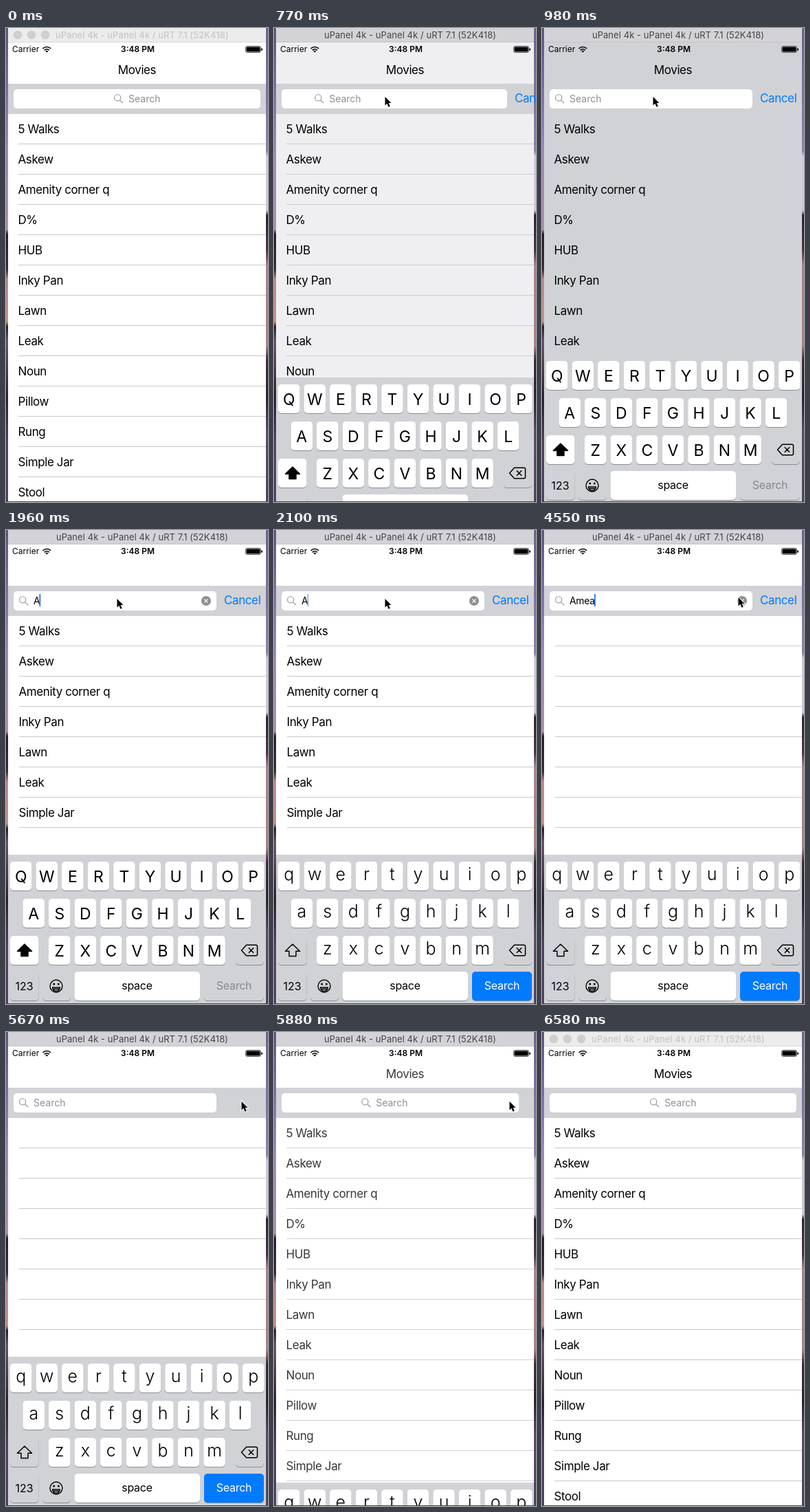
An HTML page with a canvas for the animation above (6650 ms loop, 381 by 689 pixels).

```html
<!DOCTYPE html>
<html lang="en">
<head>
<meta charset="utf-8">
<title>Movie search</title>
<style>
  html, body { margin: 0; width: 100%; height: 100%; overflow: hidden; }
  canvas { display: block; }
</style>
</head>
<body>
<canvas id="stage" width="381" height="689"></canvas>
<script>
const c = document.getElementById('stage').getContext('2d');
const LOOP = 6650, STEP = 70;
const GREY = '#d1d2d6', BLUE = '#007aff', LINE = '#c8c7cc', HINT = '#8e8e93';

const movies = ['5 Walks', 'Askew', 'Amenity corner q', 'D%', 'HUB', 'Inky Pan', 'Lawn',
  'Leak', 'Noun', 'Pillow', 'Rung', 'Simple Jar', 'Stool'];

// Step tracks: the last entry not later than t applies.
const typed = [[0, ''], [1960, 'A'], [2590, 'Am'], [4060, 'Ame'], [4550, 'Amea'], [5600, '']];
const caret = [[0, 0], [1050, 1], [1400, 0], [1540, .33], [1610, .66], [1680, 1], [2030, .8],
  [2100, .5], [2590, 1], [3220, .6], [3290, 0], [3430, .5], [3500, 1], [3780, .5], [3850, 0],
  [4060, 1], [5110, .5], [5180, 0], [5320, 1], [5530, 0]];
// Pointer stops: time, x, y; eased in between.
const pointer = [[70, 192, 26], [280, 162, 100], [3150, 162, 100], [3570, 285, 99], [3710, 285, 99],
  [3850, 286, 98], [5040, 286, 98], [5320, 343, 101], [5950, 343, 101], [6160, 293, 101],
  [6230, 272, 66], [6300, 225, 0]];

const at = (track, t) => track.findLast(k => k[0] <= t)[1];
const mix = (a, b, p) => a + (b - a) * p;
function smooth(t, start, length) {
  const p = Math.min(1, Math.max(0, (t - start) / length));
  return p * p * (3 - 2 * p);
}
// Critically damped spring: share of the way covered.
function spring(t, start) {
  const x = Math.max(0, t - start) * .0155;
  return 1 - (1 + x) * Math.exp(-x);
}

function rect(x, y, w, h, color, r = 0) {
  c.fillStyle = color;
  c.beginPath();
  c.roundRect(x, y, w, h, r);
  c.fill();
}
function disc(x, y, r, color) {
  c.fillStyle = color;
  c.beginPath();
  c.arc(x, y, r, 0, 7);
  c.fill();
}
function line(path, color, width) {
  c.strokeStyle = color;
  c.lineWidth = width;
  c.stroke(new Path2D(path));
}
function text(s, x, y, size, color = '#000', align = 'left', weight = 400, spacing = 0) {
  c.font = `${weight} ${size}px Inter, Roboto, sans-serif`;
  c.letterSpacing = spacing + 'px';
  c.textAlign = align;
  c.fillStyle = color;
  c.fillText(s, x, y);
  return c.measureText(s).width;
}

function strip(x, stops) {
  const g = c.createLinearGradient(0, 0, 0, 689);
  stops.forEach(([p, color]) => g.addColorStop(p, color));
  rect(x, 0, 3, 689, g);
}
function desktop() {
  strip(0, [[0, '#5d5478'], [.12, '#7b6a9e'], [.25, '#9a86b4'], [.425, '#b08ea6'], [.435, '#2a1c26'],
    [.51, '#3a2a38'], [.53, '#b88a8a'], [.62, '#c0908a'], [.63, '#2a1e28'], [.66, '#6a4f66'],
    [.73, '#4a3446'], [.78, '#2a2030'], [.88, '#55405e'], [1, '#4c4060']]);
  strip(378, [[0, '#6c6090'], [.26, '#8a7fae'], [.27, '#cfc8dc'], [.385, '#cfc8dc'], [.395, '#2b2030'],
    [.47, '#4a3448'], [.5, '#a88088'], [.67, '#a88080'], [.7, '#3a2a3a'], [.78, '#2a2030'],
    [.85, '#5a4866'], [1, '#4c4060']]);
  rect(0, 688, 381, 1, '#4c4060');
}

function titleBar(active) {
  rect(3, 0, 375, 21, active ? '#d3d3d7' : '#ececec', [4, 4, 0, 0]);
  rect(3, 20, 375, 1, active ? '#c4c4c8' : '#d8d8d8');
  if (!active) [17, 37, 57].forEach(x => disc(x, 10, 6.3, '#cfcfcf'));
  text('uPanel 4k - uPanel 4k / uRT 7.1 (52K418)', 198, 15, 13,
    active ? '#444' : '#c8c8c8', 'center', active ? 400 : 500, .06);
}

function statusBar() {
  text('Carrier', 9, 35, 12);
  text('3:48 PM', 191.5, 35, 12, '#000', 'center', 600);
  line('M53.5 30a8 8 0 0 1 11.6 0M55.8 32.3a5 5 0 0 1 7 0', '#000', 1.7);
  c.fillStyle = '#000';
  c.fill(new Path2D('M57.3 33.6a3 3 0 0 1 4 0l-2 2.2z'));
  line('M350.5 26.5h18q2 0 2 2v5q0 2-2 2h-18q-2 0-2-2v-5q0-2 2-2z', '#555', 1);
  rect(349.5, 27.5, 20, 7, '#000', 1);
  rect(371.3, 29.5, 1.6, 3.5, '#000', 1);
}

function separators(x) {
  for (let y = 168; y < 688; y += 44) rect(x, y, 378 - x, 1, LINE);
}
function rows(list, x) {
  list.forEach((s, i) => text(s, x, 153 + 44 * i, 17, '#000', 'left', 400, -.4));
}

function mainList(dim) {
  rect(3, 21, 375, 667, '#fff');
  separators(18);
  c.globalAlpha = dim;
  rect(3, 21, 375, 667, GREY);
  c.globalAlpha = 1;
  text('Movies', 190.5, 67, 17, '#000', 'center', 400, -.4);
  rows(movies, 17.5);
}

function results(list, alpha) {
  c.globalAlpha = alpha;
  rect(3, 21, 375, 667, '#fff');
  separators(19);
  rows(list, 18.5);
  c.globalAlpha = 1;
}

function searchBar(t, query, open, shift) {
  rect(3, 81, 375, 44, GREY);
  const right = mix(370, 306, open), x = mix(157, 19, shift);
  rect(11, 89, right - 11, 28, '#fff', 5);
  c.strokeStyle = HINT;
  c.lineWidth = 1.1;
  c.beginPath();
  c.arc(x + 5.2, 101.4, 4.6, 0, 7);
  c.moveTo(x + 8.6, 104.8);
  c.lineTo(x + 13, 109);
  c.stroke();

  let w = 0;
  if (query) {
    w = text(query, 40, 108, 14, '#000', 'left', 400, -.3);
    disc(291, 103, 7, HINT);
    line('M288.4 100.4l5.2 5.2m0-5.2l-5.2 5.2', '#fff', 1.3);
  } else {
    text('Search', x + 21, 108, 14, HINT);
  }
  c.globalAlpha = at(caret, t);
  rect(39 + w, 93, 2, 18, '#3b74f2');
  c.globalAlpha = t >= 5600 ? 0 : t >= 5530 ? .3 : 1;
  if (open > 0) text('Cancel', right + 11, 108, 17, BLUE, 'left', 400, -.4);
  c.globalAlpha = 1;
}

function key(x, y, w, color) {
  rect(x, y + 1, w, 42, '#8b8d92', 5);
  rect(x, y, w, 42, color, 5);
}

function keyboard(offset, upper) {
  c.save();
  c.beginPath();
  c.rect(3, 21, 375, 667);
  c.clip();
  c.translate(0, Math.floor(offset));
  rect(3, 472, 375, 217, GREY);

  [['qwertyuiop', 6, 482], ['asdfghjkl', 24.5, 536], ['zxcvbnm', 62, 590]].forEach(([letters, x0, y]) => {
    [...letters].forEach((ch, i) => {
      const x = x0 + 37.55 * i;
      key(x, y, 31.5, '#fff');
      if (upper) text(ch.toUpperCase(), x + 15.75, y + 29.5, 23, '#000', 'center');
      else text(ch, x + 15.75, y + 27, 25, '#000', 'center', 300);
    });
  });

  key(6, 590, 41.5, upper ? '#fff' : GREY);
  const arrow = 'M27 602l10.5 10.2h-5.5v7.3h-10v-7.3h-5.5z';
  c.lineJoin = 'round';
  line(arrow, '#000', 1.5);
  if (upper) {
    c.fillStyle = '#000';
    c.fill(new Path2D(arrow));
  }
  key(334, 590, 41, GREY);
  line('M342.5 611l7-7.8h14q2 0 2 2v11.6q0 2-2 2h-14zM352.8 607.3l7.4 7.4m0-7.4l-7.4 7.4', '#000', 1.5);

  key(6, 642, 41.5, GREY);
  text('123', 26.5, 669, 16, '#000', 'center');
  key(53, 642, 41, GREY);
  line('M82 663a9 9 0 1 1-18 0a9 9 0 1 1 18 0zM67.5 665h11q-1 5-5.5 5t-5.5-5zM68 667.3h10', '#000', 1.4);
  disc(69.7, 660, 1.5, '#000');
  disc(76.3, 660, 1.5, '#000');
  key(99.5, 642, 182.5, '#fff');
  text('space', 190.5, 668, 16, '#000', 'center', 400, -.3);
  key(288, 642, 87, upper ? GREY : BLUE);
  text('Search', 331.5, 668, 16, upper ? '#87888d' : '#fff', 'center', 400, -.3);
  c.restore();
}

function drawPointer(t) {
  if (t < 70 || t >= 6370) return;
  const i = pointer.findLastIndex(k => k[0] <= t);
  const a = pointer[i], b = pointer[i + 1] || a;
  const p = smooth(t, a[0], b[0] - a[0] || 1);
  c.save();
  c.translate(mix(a[1], b[1], p) - .5, mix(a[2], b[2], p));
  c.scale(.92, .92);
  const arrow = 'M0 0v13.5l3.1-2.9 2.3 5.4 2.5-1.1-2.3-5.2h4.2z';
  line(arrow, '#fff', 2);
  c.fillStyle = '#000';
  c.fill(new Path2D(arrow));
  c.restore();
}

function draw(t) {
  const query = at(typed, t);
  const active = t >= 490 && t < 6580;
  const close = smooth(t, 5670, 300);
  const searching = t >= 1960 && close < 1;

  desktop();
  mainList(t < 1960 ? smooth(t, 650, 300) : 0);
  if (searching) {
    const found = t >= 4550 ? [] : movies.filter(m => m.toLowerCase().includes(query.toLowerCase()));
    results(found, 1 - close);
  }
  statusBar();
  searchBar(t, query, smooth(t, 623, 300) - close, smooth(t, 577, 300) - close);
  const up = t < 5664 ? spring(t, 563) : 1 - spring(t, 5664);
  if (t >= 560 && t < 6160) keyboard(217 * (1 - up), t < 2030);
  titleBar(active);
  drawPointer(t);
}

const begin = performance.now();
function tick() {
  const t = (performance.now() - begin) % LOOP;
  draw(Math.floor(t / STEP) * STEP);
  requestAnimationFrame(tick);
}
tick();
</script>
</body>
</html>
```
